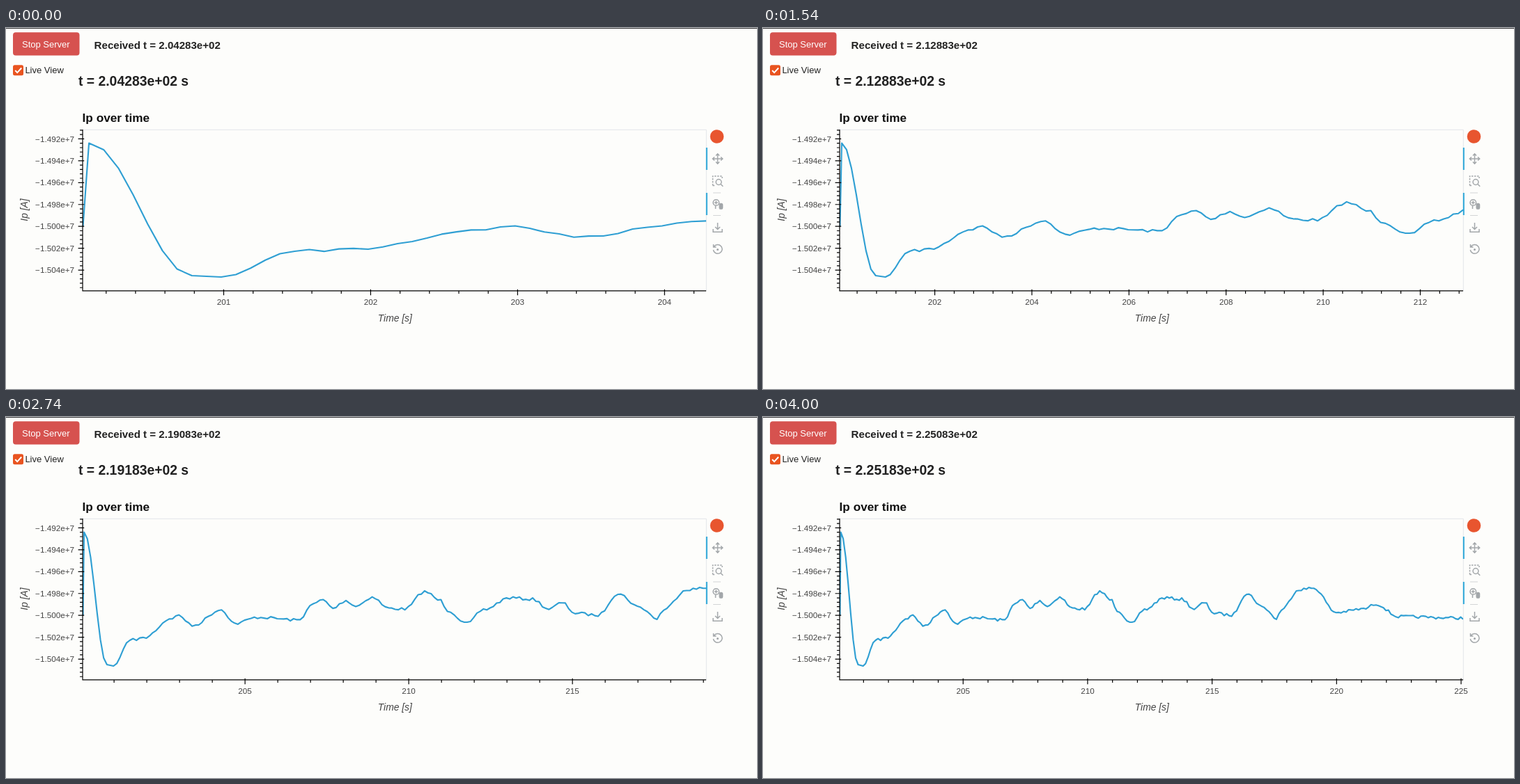
An HTML page that plays this animation: 1078x519 px, repeating every 4030 ms.

```html
<!DOCTYPE html>
<html lang="en">
<head>
<meta charset="utf-8">
<title>Live plot</title>
<style>
  html, body { margin: 0; width: 100%; height: 100%; overflow: hidden; background: #fdfdfb; }
  svg { display: block; width: 100%; height: 100%; font-family: "Liberation Sans", Arial, Helvetica, sans-serif; }
  .ui { font-size: 13px; fill: #222; }
  .bold { font-weight: bold; fill: #222; }
  .label { font-size: 11.7px; fill: #444; }
  .axis { font-size: 13.85px; font-style: italic; fill: #444; }
  .mid { text-anchor: middle; }
  .end { text-anchor: end; }
  .line { fill: none; stroke: #000; stroke-width: 1.2; }
  .icon { fill: none; stroke: #a3a7aa; stroke-width: 1.5; }
</style>
</head>
<body>
<svg viewBox="0 0 1078 519">
  <defs><clipPath id="plot"><rect x="110" y="146" width="895" height="232"/></clipPath></defs>
  <rect width="1078" height="1" fill="#3a3a3c"/>

  <rect x="10" y="6.2" width="95.5" height="33.2" rx="4" fill="#d6524f"/>
  <text class="ui mid" x="57.3" y="27.8" style="fill:#fff">Stop Server</text>
  <text id="received" class="bold" x="126.6" y="30.3" font-size="15.1"></text>
  <rect x="10" y="53.3" width="15" height="15" rx="2.5" fill="#e95420"/>
  <path d="M13.2 61l3 3.1 6-6.6" fill="none" stroke="#fff" stroke-width="2"/>
  <text class="ui" x="27.4" y="65.3">Live View</text>
  <text id="current" class="bold" x="104" y="82.7" font-size="19.35"></text>

  <text class="bold" x="109.6" y="135" font-size="17.2" style="fill:#111">Ip over time</text>
  <path d="M110 146.3H1005.3V378" fill="none" stroke="#e3e5e9"/>
  <path id="curve" clip-path="url(#plot)" fill="none" stroke="#2f9fd3" stroke-width="2.13" stroke-linejoin="round"/>
  <path class="line" d="M110 146V378M109.4 377.9H1005"/>
  <path id="yTicks" class="line"/>
  <path id="xTicks" class="line"/>
  <g id="yLabels" class="label end"></g>
  <g id="xLabels" class="label mid"></g>
  <text class="axis mid" x="558.3" y="421.8">Time [s]</text>
  <text class="axis mid" transform="translate(30.5 261.5) rotate(-90)">Ip [A]</text>

  <circle cx="1020.5" cy="156" r="9.8" fill="#e8552f"/>
  <path d="M1005.8 172V204M1005.8 237V269" stroke="#2ba6d8" stroke-width="2"/>
  <path d="M1015 237H1026M1015 269.5H1026" stroke="#d3d5d6"/>
  <g class="icon">
    <path d="M1014.5 188h14M1021.5 181v14M1019 183.5l2.5-2.7 2.5 2.7M1019 192.5l2.5 2.7 2.5-2.7M1017 185.5l-2.7 2.5 2.7 2.5M1026 185.5l2.7 2.5-2.7 2.5"/>
    <path d="M1014.5 226.5v-13.5h13.5v3M1014.5 226.5h4" stroke-dasharray="2.5 1.5"/>
    <circle cx="1023" cy="221.5" r="3.9"/><path d="M1026 224.5l3.2 3.2"/>
    <circle cx="1019.3" cy="251" r="4.3"/><path d="M1019.3 248.5v5M1016.8 251h5M1018.5 255.5v4.5"/>
    <rect x="1024.2" y="252.5" width="4.3" height="7.5" rx="1.8" fill="#a3a7aa"/>
    <path d="M1021.5 280v9M1018 286l3.5 3.5 3.5-3.5M1015 289v4.3h13v-4.3"/>
    <path d="M1016.2 314.5a6.4 6.4 0 1 1-.9 4.5M1015.5 311v4h4"/>
    <circle cx="1021.5" cy="318.5" r=".8"/>
  </g>
</svg>
<script>
const $ = id => document.getElementById(id);
const LEFT = 110, WIDTH = 895, BOTTOM = 377.9, ZERO_Y = 285.2, MINOR_Y = 6.29;
const START = 200.04, FIRST = 200.083, STEP = 0.1, LOOP = 4030;

// Turning points of the signal: [sample, height].
const turns = [
  [0, 165.5], [7, 356], [9, 358], [14, 321], [18, 318], [27, 289], [29, 285], [33, 300], [42, 277], [46, 297],
  [53, 288], [66, 292], [69, 271], [73, 263], [76, 275], [80, 264], [83, 272], [88, 259], [93, 275], [98, 276],
  [104, 251], [109, 264], [111, 278], [117, 297], [122, 277], [130, 260], [137, 262], [142, 276], [146, 267], [150, 282],
  [157, 285], [163, 254], [170, 274], [175, 290], [177, 277], [184, 248], [190, 246], [199, 281], [210, 276], [215, 269],
  [224, 287], [250, 289]];
// How far the stream has come: [tick, sample].
const progress = [[0, 42.2], [27, 96.5], [46, 128.1], [72, 175.1], [91, 204.5], [108, 230.8], [120, 250.5]];

const linear = f => f;
const smooth = f => (1 - Math.cos(Math.PI * f)) / 2;

function interpolate(keys, at, ease) {
  const next = Math.max(1, keys.findIndex(key => key[0] >= at));
  const [x0, y0] = keys[next - 1], [x1, y1] = keys[next];
  return y0 + (y1 - y0) * ease((at - x0) / (x1 - x0));
}

function seededRandom(seed) {
  return () => (seed = seed * 16807 % 2147483647) / 2147483647;
}

const random = seededRandom(7);
const heights = Array.from({ length: 251 }, (_, k) => {
  const noise = k < 15 ? 0 : 4 * (random() - 0.5);
  return interpolate(turns, k, smooth) + noise;
});

const timeOf = k => FIRST + STEP * k;
const format = k => (timeOf(k) / 100).toFixed(5) + "e+02";

function addText(parent, x, y, text = "") {
  const el = document.createElementNS("http://www.w3.org/2000/svg", "text");
  el.setAttribute("x", x);
  el.setAttribute("y", y);
  el.textContent = text;
  parent.append(el);
  return el;
}

function drawYAxis() {
  let d = "";
  for (let i = -22; i <= 14; i++) {
    const y = ZERO_Y + i * MINOR_Y, major = i % 5 === 0;
    d += `M${major ? 103.6 : 106} ${y}H${major ? 112.2 : LEFT}`;
    if (major) addText($("yLabels"), 98, y + 4.1, `−${(1.5 + i * 0.0004).toFixed(3)}e+7`);
  }
  $("yTicks").setAttribute("d", d);
}

const xLabels = Array.from({ length: 10 }, () => addText($("xLabels"), 0, 398.3));

// Picks the tick interval that comes closest to six major ticks.
function drawXAxis(end, toX) {
  const error = size => Math.abs(6 - (end - START) / size);
  const major = [1, 2, 5].reduce((best, size) => error(size) < error(best) ? size : best);
  const minor = major / 5;
  let d = "", used = 0;
  for (let i = Math.ceil(START / minor); i * minor <= end; i++) {
    const x = toX(i * minor), isMajor = i % 5 === 0;
    d += `M${x} ${isMajor ? 375.8 : BOTTOM}V${isMajor ? 384.3 : 382}`;
    if (isMajor) {
      const label = xLabels[used++];
      label.setAttribute("x", x);
      label.textContent = Math.round(i * minor);
    }
  }
  xLabels.slice(used).forEach(label => label.textContent = "");
  $("xTicks").setAttribute("d", d);
}

// The heading runs slightly ahead of the status text, and that ahead of the plot.
function draw(tick) {
  const head = interpolate(progress, tick, linear);
  const last = Math.floor(head);
  const end = timeOf(last);
  const toX = t => LEFT + (t - START) / (end - START) * WIDTH;
  const points = heights.slice(0, last + 1).map((y, k) => `L${toX(timeOf(k)).toFixed(2)} ${y.toFixed(2)}`);
  $("curve").setAttribute("d", `M${LEFT + 0.5} ${ZERO_Y}` + points.join(""));
  drawXAxis(end, toX);
  $("received").textContent = `Received t = ${format(Math.floor(head + 0.3))}`;
  $("current").textContent = `t = ${format(Math.floor(head + 0.55))} s`;
}

let shown = -1;
const origin = performance.now();
function animate() {
  const ms = (performance.now() - origin) % LOOP;
  const tick = Math.min(120, Math.floor(Math.floor(ms / 10) * 3 / 10));
  if (tick !== shown) draw(shown = tick);
  requestAnimationFrame(animate);
}

drawYAxis();
animate();
</script>
</body>
</html>
```
